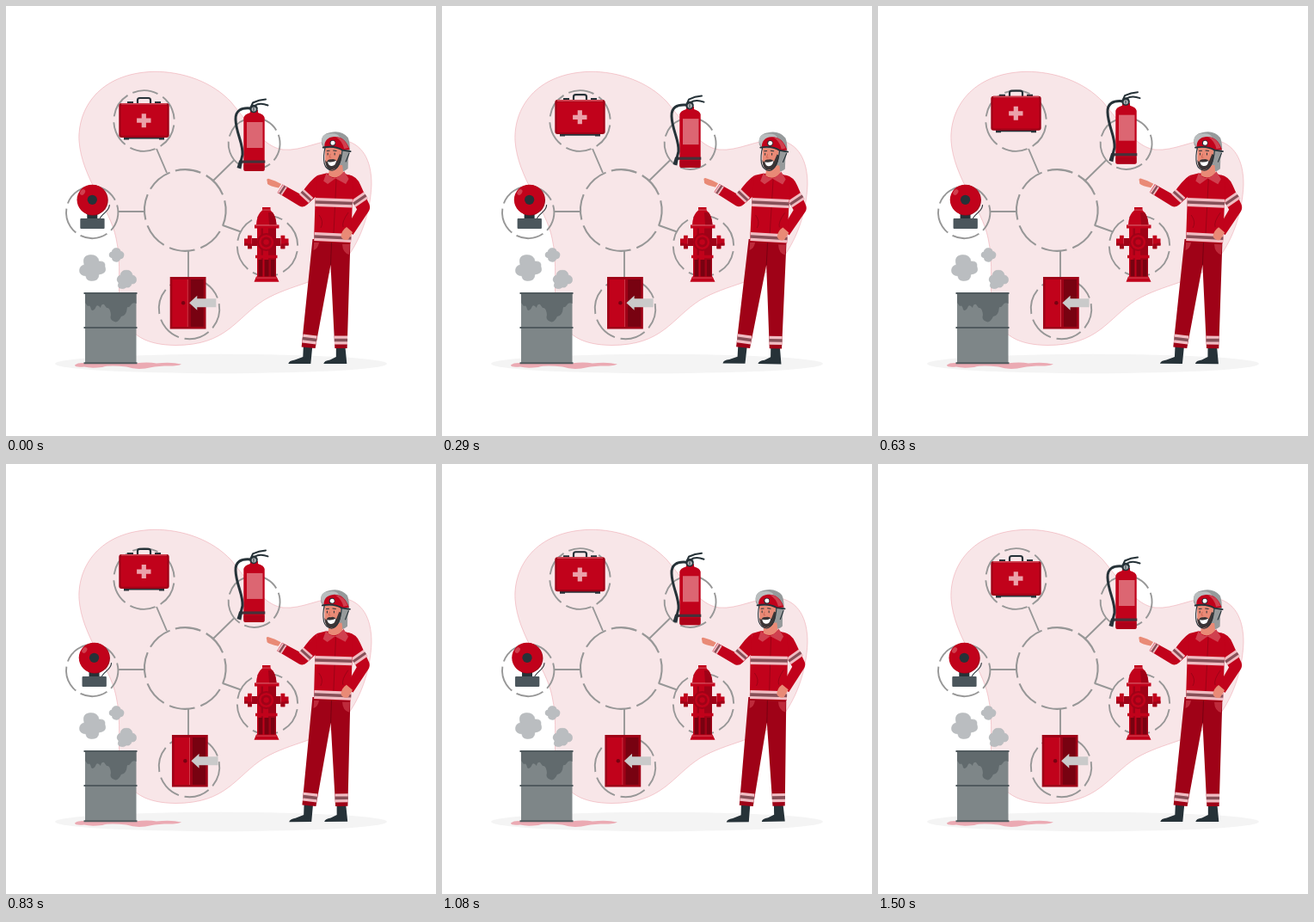
An HTML page that plays this animation: 500x500 px, repeating every 1.54 s.

```html
<!DOCTYPE html>
<html lang="en">
<head>
<meta charset="utf-8">
<title>Fire safety</title>
<style>
  html, body { margin: 0; width: 100%; height: 100%; overflow: hidden; background: #fff; }
  svg { display: block; width: 100%; height: 100%; }
  .red { fill: #c1021b; }
  .mid { fill: #9f0217; }
  .deep { fill: #780211; }
  .pink { fill: #eba1aa; }
  .soft { fill: #d0404f; }
  .ink { fill: #263238; }
  .skin { fill: #e98a76; }
  .smoke { fill: #babdc0; stroke: #b1b4b7; stroke-width: .5; }
  .wire { fill: none; stroke: #263238; stroke-linecap: round; stroke-linejoin: round; }
  .rings { fill: none; stroke: #979797; stroke-width: 1.9; }
  .large { stroke-dasharray: 30 6.860; }
  .small { stroke-dasharray: 31.500 6.200; }
  .tape { fill: none; stroke: #f0bcc2; stroke-width: 10; }
  .tape + .tape { stroke: #875058; stroke-width: 3.6; }
</style>
</head>
<body>
<svg viewBox="0 0 500 500">
  <path fill="#f8e6e8" stroke="#efaab2" stroke-width=".6" d="M172 76.300C205 76 240 88 262 112C285 140 300 164 322 167C345 169 365 155 390 155.500C415 159 425 180 425 207C424 240 412 275 392 298C368 322 332 323 300 342C267 363 257 394.500 197 394.500C165 394 142 385 133 352C129 330 135 300 128 270C121 235 88 200 85 157C83 120 108 78 172 76.300Z"/>
  <ellipse cx="250" cy="416" rx="193" ry="11.200" fill="#f4f4f4"/>

  <g class="rings">
    <circle cx="208.300" cy="237.500" r="47.300" stroke-dasharray="30 7.150" stroke-width="2.100" transform="rotate(-104 208.300 237.500)"/>
    <circle class="large" cx="160.500" cy="133.500" r="35.200" transform="rotate(-112 160.500 133.500)"/>
    <circle class="small" cx="288.600" cy="160" r="30" transform="rotate(-20 288.600 160)"/>
    <circle class="small" cx="100.200" cy="240" r="30.200" transform="rotate(57 100.200 240)"/>
    <circle class="large" cx="304" cy="279" r="35.200" transform="rotate(10 304 279)"/>
    <circle class="large" cx="213" cy="352" r="35.200" transform="rotate(50 213 352)"/>
    <path d="M175 166L187 194M265 179.500L241 203M130 239H161M252 255L273 262.500M212 285V317"/>
  </g>

  <g id="kit">
    <path class="wire" stroke-width="2.200" d="M153 113.500V109.500Q153 107 155.500 107H165.500Q168 107 168 109.500V113.500"/>
    <path class="ink" d="M141 111h7v3h-7zM173 111h7v3h-7zM137 152h47v2.600h-47zM137 154h6v1.500h-6zM178 154h6v1.500h-6z"/>
    <rect class="mid" x="131.300" y="113" width="58.400" height="40" rx="3"/>
    <rect class="red" x="133.500" y="115.300" width="54" height="35.500" rx="2"/>
    <path class="soft" d="M134 113h53v1.800h-53z"/>
    <path class="pink" d="M157.700 125.200h5.200v5.400h5.600v5.200h-5.600v5.400h-5.200v-5.400h-5.600v-5.200h5.600z"/>
  </g>

  <g id="can">
    <path class="red" d="M276.300 190V130Q277 126 284 124V121H293V124Q300 126 300.700 130V190Q300.700 192 298.500 192H278.500Q276.300 192 276.300 190Z"/>
    <path class="mid" d="M276.300 184H300.700V190Q300.700 192 298.500 192H278.500Q276.300 192 276.300 190Z" opacity=".55"/>
    <rect x="280" y="135" width="18.500" height="30" fill="#dc6672"/>
    <rect x="271" y="179.500" width="30.300" height="3.200" fill="#45323a"/>
    <path class="wire" stroke-width="3" d="M284 119C273 118 266.500 122 267 132C267.500 148 276 160 275 173L272.500 183"/>
    <path class="ink" d="M271 180L275 181L273.300 189.500L268.500 188Z"/>
    <path class="wire" stroke-width="2" d="M285 117L287 112.500Q294 109 302 108.500M289 116Q295 112 304.500 115.500"/>
    <circle class="ink" cx="288" cy="119.500" r="4.800"/>
    <circle cx="288.200" cy="120" r="2.600" fill="#b5babd"/>
    <path class="wire" stroke-width="1" d="M288 121.500V118.500"/>
  </g>

  <g id="bell">
    <path class="wire" stroke-width="1.100" d="M120 231.500C119.500 239 114 239 109 246.500"/>
    <path class="ink" d="M94 240h12v9h-12z"/>
    <rect x="86" y="247" width="28.300" height="12" rx="1" fill="#4b565c"/>
    <circle class="mid" cx="100.700" cy="225.800" r="17.700"/>
    <circle class="red" cx="99.800" cy="225.300" r="17.600"/>
    <circle class="ink" cx="100" cy="225.300" r="5.600"/>
    <ellipse class="soft" cx="88.800" cy="216.500" rx="2.600" ry="3.700" transform="rotate(35 88.800 216.500)"/>
  </g>

  <g id="door">
    <path class="mid" d="M190.400 315h41.800v60.500h-41.800z"/>
    <path class="deep" d="M212 318h17.500v55h-17.500z"/>
    <path class="red" d="M193 318h18.500v55H193z"/>
    <path class="soft" d="M210.500 318h1v55h-1z"/>
    <path class="mid" d="M211.500 318h3v55h-3z"/>
    <circle class="deep" cx="205.800" cy="345.300" r="2.200"/>
    <path fill="#cacaca" d="M212.800 345.200L222 336.700V340.200H244V350.200H222V353.700Z"/>
  </g>

  <g id="hydrant">
    <path class="mid" d="M286 270h33.500v9H286z"/>
    <path class="red" d="M277 270.500h4v8h-4zM281 266.800h4.800v15.400H281zM319.500 266.800h4.800v15.400h-4.800zM324.300 270.500h4.200v8h-4.200z"/>
    <path class="mid" d="M277 275.500h4v3h-4zM281 276.500h4.800v5.700H281zM319.500 276.500h4.800v5.700h-4.800zM324.300 275.500h4.200v3h-4.200z"/>
    <path class="red" d="M298 234h9.500v3.500l2.500 2.500Q314 245 314.500 254.500H291Q291.500 245 295.500 240L298 237.500z"/>
    <path class="mid" d="M292 258h22v59h-22zM305 240H310Q314 246 314.500 254.500H306z"/>
    <path class="red" d="M292 258h4.500v57H292zM299 258h6v57h-6z"/>
    <path class="soft" d="M298 236.500h9.500v1.300H298z"/>
    <path class="deep" d="M293.500 295h4.500v20.500h-4.500zM300.500 295h5v20.500h-5zM308 295h4.500v20.500H308z"/>
    <path class="red" d="M289 254.500h28.500v4H289zM290 289.800h25.500v3.500H290zM291 314.500h23.500l3 6.300H288.500z"/>
    <path class="soft" d="M290 254.500h26v1.300h-26zM291 315.500h23.500v1.300H291z"/>
    <circle class="mid" cx="302.600" cy="274.500" r="10.500"/>
    <circle class="red" cx="302.600" cy="274.500" r="8.600"/>
    <circle class="mid" cx="302.600" cy="274.500" r="6"/>
    <circle class="red" cx="302.600" cy="274.500" r="3.200"/>
  </g>

  <path fill="#ebaab3" d="M80 417.500Q84 414 96 415.500H150Q165 413.500 175 415.500Q192 413.500 204 416.500Q200 419 184 418.500Q172 419 162 421.500Q150 423 140 419.500Q120 417.500 112 420Q98 421.500 91 419.500Q80 420.500 80 417.500Z"/>
  <g id="barrel">
    <path fill="#7e8688" d="M92 334h59.500v81.500H92z"/>
    <path fill="#616a6d" d="M92 334H151.500V346Q147 344 145 348Q143 351 141 350Q140 361 134 361Q130 369 126 367Q120 365 122 359Q121 350 117 351L114 347Q111 346 110 351Q107 347 105 349Q102 356 99 353Q98 347 95 349L92 345Z"/>
    <path fill="#505a5e" d="M90.500 333h62v2h-62zM90.500 373h62v2h-62zM90.500 414.300h62v2h-62z"/>
  </g>

  <path class="smoke" d="M91 301Q88 290 98 289.500Q107 289 108 297Q116 296 115 303Q118 311 108 312Q108 320 99 319.500Q93 319 93 314Q85 313 85.500 307Q86 302 91 301Z"/>
  <path class="smoke" d="M123 286Q124 281 129 281.500Q133 282 133 285Q137.500 286 137 290Q136.500 294 133 294Q131 298.500 126.500 297Q123 296 123.500 293Q119.500 292 120 289Q120.500 286 123 286Z"/>
  <path class="smoke" d="M133 313Q134 307 140 307.300Q146 307 147 313Q152 314 151.500 319Q151 323.500 146 323Q145 328 140 327Q137 330 132 328Q129 326 131 322Q128 319 129.500 316Q130.500 313.500 133 313Z"/>

  <g id="man">
    <path class="ink" d="M346 395H356.500L354.500 416H328.500Q329 412.500 336 411.500L345.500 408zM384 395H394.500L396.500 416H369.500Q370 412.500 377 411.500L384 408z"/>
    <path class="mid" d="M356.500 271H400.500L396.800 398H382.500L377.500 301L359.800 398L343.800 396.500Z"/>
    <path d="M377.500 301L378.500 275" fill="none" stroke="#780211"/>
    <path class="soft" opacity=".65" d="M358 275H364Q363 282 357.500 284zM391 277Q391.500 287 399 289L399.700 277z"/>
    <g><path class="tape" d="M345 386.500L361.200 388.500"/><path class="tape" d="M345 386.500L361.200 388.500"/></g>
    <g><path class="tape" d="M382 388.500H397.200"/><path class="tape" d="M382 388.500H397.200"/></g>

    <path class="skin" d="M320 207L313 203.500L305 200.800Q302.500 201 303.500 203.500L304 207Q307 209.500 317 211.500Z"/>
    <path class="red" d="M362 197Q354 202 342.500 219L321.500 207.500L315.500 217L341 232.500Q346 235 350 231L363 219Z"/>
    <g><path class="tape" style="stroke-width:8" d="M343.500 216L354.500 226"/><path class="tape" style="stroke-width:3" d="M343.500 216L354.500 226"/></g>
    <g><path class="tape" style="stroke-width:6" d="M324.300 209.500L318.300 218.500"/><path class="tape" style="stroke-width:2.400" d="M324.300 209.500L318.300 218.500"/></g>

    <path class="red" d="M398 196Q408 198 412 208L422.500 231Q424 235 421.500 239L403.500 266L395 259L408 236.500L399 220Z"/>
    <g><path class="tape" style="stroke-width:9" d="M404 230L418.500 220"/><path class="tape" style="stroke-width:3.200" d="M404 230L418.500 220"/></g>
    <path class="red" d="M362 197L372 194.500H393L402 198Q404.500 215 402.500 235L401 275.500L358 273.500L359.500 225Z"/>
    <path d="M384 200L380.500 274M364 243Q370 251 366 258M398 240Q390 251 392 257" fill="none" stroke="#8c0315" stroke-width=".7"/>
    <g><path class="tape" d="M359.500 228L402.700 229.500"/><path class="tape" d="M359.500 228L402.700 229.500"/></g>
    <g><path class="tape" d="M358.400 268L401.300 270"/><path class="tape" d="M358.400 268L401.300 270"/></g>
    <path class="skin" d="M396 257L403 263L398 271.500Q392 273.500 389.500 268Q390 261 396 257Z"/>

    <path fill="#969a9b" d="M367 161Q365 149 377 147Q390 144 397.500 153Q400 159 399.500 168Q397 178 397.500 189Q392 194 385 192Z"/>
    <path class="skin" d="M376 185H391L392 194Q384 203 375 197Z"/>
    <path class="soft" d="M372.500 194L369 203.500L374 207L383 200.500L395 207L398.500 201L393 192Q388 199 383 200Q376 200 372.500 194Z"/>
    <path class="skin" d="M371 165H390L389 181Q386 190.500 378 190.500Q371.500 189 371 179Z"/>
    <path fill="#3b3536" d="M371 179L372.800 181.500Q374.500 177.500 378 178.300Q382.500 177 384.500 180.500L388 172L389.800 173Q390 182 386 187Q381 192 375 189.500Q371 186.500 371 179Z"/>
    <path fill="#fff" d="M374 181Q379 182.500 384 179.800Q383 186.500 378 186Q374.500 185.500 374 181Z"/>
    <path class="wire" stroke-width="1" d="M374 171V173M382 171V173M373 168.500L376 168.300M380.500 168L384 168.500"/>
    <path fill="none" stroke="#c9604f" stroke-width=".8" d="M377 172L375.800 176H378"/>
    <path class="wire" stroke-width="1.100" d="M371 164Q368.500 174 370 183Q372 190.500 379 191.200Q389 190 391 167M399 171L395 181"/>
    <path fill="#b9bdbe" d="M367 158Q366 149 375 148.500Q386 147 388 153L370 164Z"/>
    <path class="red" d="M370 164Q370 153 381 152Q394 151 399.500 167L391 168Q380 162 370 164Z"/>
    <path class="soft" d="M383 152Q394 153 398 165L393 166Q391 157 383 152Z"/>
    <path class="wire" stroke-width="1.800" d="M368.500 164.500Q382 162 391 167.500L400.500 169"/>
    <circle class="ink" cx="379.700" cy="159.300" r="3.400"/>
    <circle cx="379.900" cy="159.300" r="2.500" fill="#fff"/>
  </g>
</svg>
<script>
  const LOOP = 1540, FPS = 24, STEPS = 36, LEAD = 0.02;
  const sway = [[0, 0], [.25, 1], [.75, -1], [1, 0]];
  const lift = [[0, 0], [.5, -10], [1, 0]];
  const shake = [[0, 0], [.1, -1], [.2, 2], [.3, -4], [.4, 4], [.5, -4],
                 [.6, 4], [.7, -4], [.8, 2], [.9, -1], [1, 0]];

  const at = (keys, p) => {
    const i = keys.findIndex(k => k[0] > p);
    const [a, u] = keys[i - 1], [b, v] = keys[i];
    return u + (v - u) * (p - a) / (b - a);
  };
  const move = (id, value) => document.getElementById(id).setAttribute('transform', value);

  // The motion steps at 24 fps on a 10 ms grid; the last step repeats the first.
  function draw(now) {
    const t = Math.floor((now % LOOP) / 10) * 10 + 4.9;
    const p = (Math.floor(t * FPS / 1000) / STEPS + LEAD) % 1;
    const y = at(lift, p) + 0.4, x = at(shake, p) + 0.5;
    move('kit', `translate(0 ${y})`);
    move('can', `translate(0 ${y})`);
    move('bell', `translate(${x} 0)`);
    move('door', `translate(${x} 0)`);
    move('man', `rotate(${at(sway, p)} 363.500 281.500)`);
  }

  let start;
  function tick(now) {
    start ??= now;
    draw(now - start);
    requestAnimationFrame(tick);
  }
  draw(0);
  requestAnimationFrame(tick);
</script>
</body>
</html>
```
